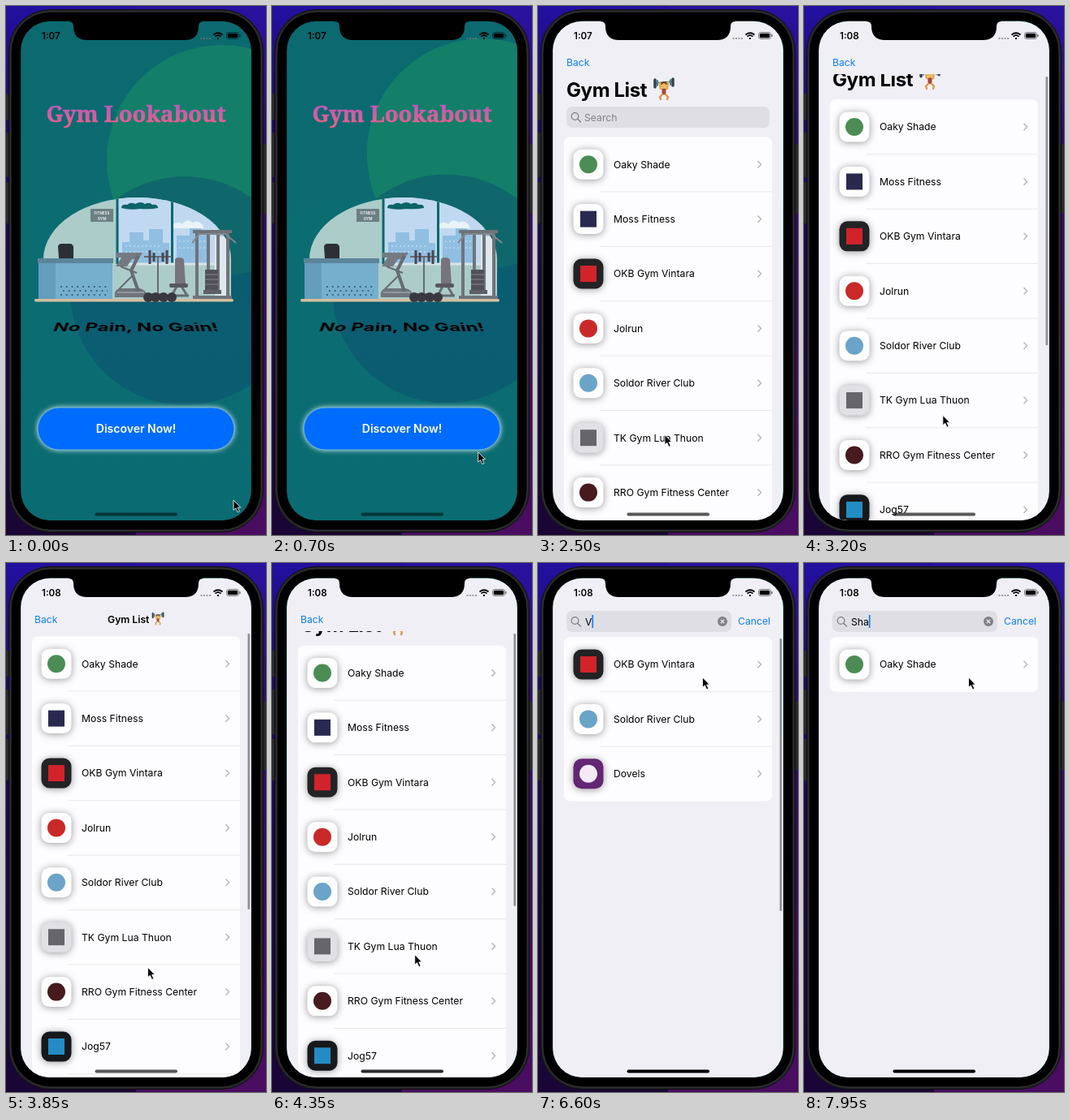
An HTML page that plays this animation: 320 by 652 pixels, repeating every 8 s.

```html
<!DOCTYPE html>
<html lang="en">
<head>
<meta charset="utf-8">
<title>Gym finder</title>
<style>
html, body { margin: 0; width: 100%; height: 100%; overflow: hidden; background: #160a3c; }
#stage { position: relative; width: 320px; height: 652px; overflow: hidden; }
#stage svg, #screen, #home, #list { position: absolute; left: 0; top: 0; width: 320px; height: 652px; }
#screen { clip-path: inset(18.7px 18.2px 18px 18.2px round 36px); }
#home { background: linear-gradient(#0b696f, #0b6d72 60%, #0a6b72); }
#slogan {
  position: absolute; left: 0; top: 381px; width: 320px; height: 30px;
  font: 700 24px/30px Inter, sans-serif; text-align: center; white-space: nowrap;
  transform: perspective(350px) rotateX(55deg);
}
text { font-family: Inter, sans-serif; font-size: 12.2px; }
.logo { font: 700 27.5px "Noto Serif", serif; }
.blue { fill: #0f7fee; }
.tile { filter: drop-shadow(0 1px 5px #0006); }
</style>
</head>
<body>
<div id="stage">
  <svg viewBox="0 0 320 652">
    <defs>
      <linearGradient id="wallLeft" x2="0" y2="1">
        <stop stop-color="#2310a0"/><stop offset=".2" stop-color="#1d0a6e"/>
        <stop offset=".5" stop-color="#1b0750"/><stop offset="1" stop-color="#1a0536"/>
      </linearGradient>
      <linearGradient id="wallRight" x2="0" y2="1">
        <stop stop-color="#2a12a0"/><stop offset=".25" stop-color="#2c0b70"/>
        <stop offset=".6" stop-color="#3a0a5c"/><stop offset="1" stop-color="#4a0d62"/>
      </linearGradient>
    </defs>
    <rect width="160" height="652" fill="url(#wallLeft)"/>
    <rect x="160" width="160" height="652" fill="url(#wallRight)"/>
    <path d="M0 108h5v32H0zM0 156h5v55H0zM0 217h5v51H0zM315 170h5v85h-5z" fill="#29282c"/>
    <rect x="3.5" y="4.5" width="313" height="644" rx="51" fill="#232325" stroke="#101012"/>
    <rect x="6" y="7" width="308" height="639" rx="49" stroke="#444447" stroke-width=".8"/>
  </svg>

  <div id="screen">
    <div id="home">
      <svg viewBox="0 0 320 652">
        <defs>
          <linearGradient id="pink" x2="0" y2="1">
            <stop offset=".15" stop-color="#b957c2"/><stop offset=".85" stop-color="#e8608c"/>
          </linearGradient>
          <clipPath id="dome"><path d="M46 362V312A115.500 76 0 0 1 277 312V362z"/></clipPath>
        </defs>
        <circle id="green" r="142" fill="#137f68"/>
        <circle id="navy" r="141" fill="#0d496f" opacity=".45"/>
        <text class="logo" x="160" y="143" text-anchor="middle" fill="url(#pink)" stroke="url(#pink)" stroke-width=".5">Gym Lookabout</text>

        <g clip-path="url(#dome)">
          <rect x="41" y="230" width="240" height="132" fill="#acccca"/>
          <rect x="138" y="230" width="123" height="88" fill="#c0d9f0"/>
          <path d="M143 318V291h9V279h17V289h7V275h17V292h8V318zM210 318V283h16V270h14V281h10V318z" fill="#90bfe2"/>
          <path d="M147 296h42M147 303h42M213 290h34M213 298h34" stroke="#b4d4ed" stroke-width="2" stroke-dasharray="2 3"/>
          <path d="M205 270q6-6 12-1q5-8 13-2q7-4 13 4v3h-38z" fill="#eaf3fa"/>
          <path d="M137 230v88M204.500 230v88" stroke="#0b676c" stroke-width="3"/>
          <path d="M138 318h124" stroke="#d8e6e6" stroke-width="3"/>
          <path d="M257 284h14v77h-14z" fill="#dfe8ee"/>
        </g>
        <path d="M142 249q0-5 7-4q5-4 10-1q7-4 12 0q6-3 9 1q7-1 7 4q-10 2-22 1q-12 2-23-1z" fill="#0c6467"/>
        <rect x="104" y="250" width="28" height="16" fill="#6c7f83"/>
        <g fill="#e8eeee" text-anchor="middle" font-weight="700">
          <text x="118" y="257" style="font-size:4.500px">FITNESS</text>
          <text x="118" y="263.500" style="font-size:4.500px">GYM</text>
        </g>
        <rect x="35" y="361" width="245" height="3.500" rx="1.700" fill="#d5bf9d"/>
        <path d="M65 311L64 296q1-3 4-3l11 0q3 0 4 4l0 14z" fill="#2c3036"/>
        <path d="M40 317h91v44H40z" fill="#76afce"/>
        <path d="M40 317h21v44H40z" fill="#659dbc"/>
        <path d="M39 311h93v6H39z" fill="#5c8599"/>
        <path d="M67 346h58M70 351h55M67 356h58" stroke="#35617b" stroke-width="1.800" stroke-dasharray="1.800 5"/>
        <path d="M136 304h32l-5 8h-8l-6 9h-14l7-11h-6z" fill="#757a82"/>
        <path d="M134 359q-2-8 5-11h26q8 2 9 11z" fill="#70757d"/>
        <g fill="none" stroke="#666b73">
          <path d="M163 308l-9 18l9 26" stroke-width="4"/>
          <path d="M141 321l20 8M139 349l17-17" stroke-width="2"/>
          <path d="M137 353h33" stroke="#91979e" stroke-width="2"/>
          <path d="M170 309h34M187 309v45M176 355h21" stroke-width="2"/>
          <path d="M177 301v17M182 304v11M193 304v11M198 301v17" stroke="#4b4750" stroke-width="3"/>
          <path d="M212 342l-8 15M214 342l9 15M202 357h23" stroke-width="3"/>
          <path d="M235 277v83M273 277v83M249 277v76M261 277v76M230 278h48M230 359h48" stroke="#70737a" stroke-width="4"/>
          <path d="M229 292l9-11h32l13 11" stroke="#84868d" stroke-width="2"/>
        </g>
        <path d="M208 313q0-3 5-3t6 3l2 30h-13z" fill="#77747e"/>
        <rect x="201" y="342" width="23" height="5" rx="2" fill="#595760"/>
        <path d="M245 325h16v25h-16z" fill="#505159"/>
        <path d="M245 331h16M245 337h16M245 343h16" stroke="#85878e"/>
        <rect x="243" y="350" width="22" height="5" fill="#5f6068"/>
        <path d="M170 359h36" stroke="#888" stroke-width="3"/>
        <g fill="#383940"><circle cx="175" cy="359" r="6"/><circle cx="184" cy="359" r="6"/><circle cx="194" cy="359" r="6"/><circle cx="204" cy="359" r="6"/></g>

        <rect x="39" y="495" width="242" height="52" rx="26" fill="#006cff" stroke="#6db6d0" style="filter:drop-shadow(0 0 3px #d5e7e8)"/>
        <text id="cta" text-anchor="middle" y="5" fill="#fff" style="font-size:14px" font-weight="600">Discover Now!</text>
      </svg>
      <div id="slogan">No Pain, No Gain!</div>
    </div>

    <div id="list">
      <svg viewBox="0 0 320 652">
        <defs>
          <clipPath id="below"><rect y="84" width="320" height="568"/></clipPath>
          <g id="lifter" fill="none" stroke-linecap="round">
            <path d="M2 5L24 3" stroke="#555d66" stroke-width="1.500"/>
            <path d="M2 1v9M24 0v8" stroke="#30424e" stroke-width="3.500"/>
            <path d="M5 2v6M21 1v6" stroke="#3e8596" stroke-width="2"/>
            <path d="M8 5l1 7l4 1l4-1l1-8" stroke="#e4a94f" stroke-width="2.600"/>
            <circle cx="13" cy="8" r="3.300" fill="#edb95c"/>
            <path d="M10 6q3-4 6 0" stroke="#6b4327" stroke-width="2"/>
            <path d="M13 14v3" stroke="#a8483a" stroke-width="5"/>
            <path d="M11 19l-3 3l1 3M15 19l3 3l-1 3" stroke="#d99c4c" stroke-width="2.400"/>
          </g>
        </defs>
        <rect width="320" height="652" fill="#f0eff6"/>
        <g id="rows">
          <rect id="card" x="32" width="256" rx="7" fill="#fdfcfe"/>
        </g>
        <text id="back" class="blue" x="35" y="74">Back</text>
        <g id="small" font-weight="600">
          <text x="125" y="73.500">Gym List</text>
          <use href="#lifter" transform="translate(179.500 61.500) scale(.58)"/>
        </g>
        <g clip-path="url(#below)">
          <g id="large">
            <text x="35" y="112" font-weight="700" letter-spacing="-.4" style="font-size:24px">Gym List</text>
            <use href="#lifter" x="142" y="90"/>
          </g>
        </g>
        <rect id="field" x="35" rx="7"/>
        <g id="inside">
          <g fill="none" stroke="#7f7e84" stroke-width="1.300" stroke-linecap="round">
            <circle cx="45.500" cy="12" r="4.300"/><path d="M49 15.500l3.500 3.500"/>
          </g>
          <text id="query" y="17.500"></text>
          <rect id="caret" y="5" width="1.700" height="16" fill="#167ef0"/>
          <g id="clear">
            <circle cx="227" cy="13" r="6" fill="#828187"/>
            <path d="M224.800 10.800l4.400 4.400M229.200 10.800l-4.400 4.400" stroke="#e8e7ee" stroke-width="1.300"/>
          </g>
        </g>
        <text id="cancel" class="blue" y="76">Cancel</text>
        <rect id="scrollbar" x="297.500" width="2.600" rx="1.300" fill="#8f8e94"/>
      </svg>
    </div>
  </div>

  <svg viewBox="0 0 320 652">
    <path d="M77 18h166v1q-6 0-6 6q0 17-17 17H100q-17 0-17-17q0-6-6-6z"/>
    <text id="clock" x="44" y="41" font-weight="600" style="font-size:11.600px"></text>
    <path d="M239.500 40h13" stroke="#777" stroke-opacity=".7" stroke-width="2" stroke-dasharray="2 1.500"/>
    <g fill="none" stroke="#000" stroke-width="1.700">
      <path d="M255.500 35.500q5.500-4.500 11 0M257.500 37.700q3.500-3 7 0"/>
      <path d="M260 40h2" stroke-width="2"/>
    </g>
    <rect x="271.500" y="32.500" width="15" height="8" rx="2.500" fill="none" stroke="#0007"/>
    <rect x="272.800" y="33.800" width="12.400" height="5.400" rx="1.500"/>
    <path d="M288 35v3" stroke="#0009" stroke-width="1.200"/>
    <rect id="homebar" x="109.500" y="624.500" width="101.500" height="4" rx="2"/>
    <g id="pointer">
      <path d="M0 0V14.500L3.300 11.500L6 17.500L8.600 16.300L6 10.600H10.300z" transform="scale(.85)" stroke="#fff" stroke-linejoin="round"/>
    </g>
  </svg>
</div>

<script>
const LOOP = 8000, PITCH = 67.4;
const $ = id => document.getElementById(id);
const set = (el, attrs) => { for (const k in attrs) el.setAttribute(k, attrs[k]); };
const make = (tag, attrs, parent) => {
  const el = document.createElementNS('http://www.w3.org/2000/svg', tag);
  set(el, attrs);
  return parent.appendChild(el);
};
const clamp = v => Math.max(0, Math.min(1, v));
const mix = (a, b, k) => a + (b - a) * k;

// Eased value at t from [time, value] steps.
function track(t, steps) {
  let [t0, v0] = steps[0];
  for (const [t1, v1] of steps) {
    if (t < t1) {
      const k = clamp((t - t0) / (t1 - t0));
      return mix(v0, v1, k * k * (3 - 2 * k));
    }
    [t0, v0] = [t1, v1];
  }
  return v0;
}
const latest = (t, steps) => steps.filter(s => s[0] <= t).pop()[1];

// name, tile colour, mark colour, mark is round
const gyms = [
  ['Oaky Shade', '#fdfdfd', '#4b8c55', 1],
  ['Moss Fitness', '#fdfdfd', '#29294f', 0],
  ['OKB Gym Vintara', '#232325', '#d2232b', 0],
  ['Jolrun', '#fdfdfd', '#c92a27', 1],
  ['Soldor River Club', '#fdfdfd', '#6ba4c9', 1],
  ['TK Gym Lua Thuon', '#e1e0e4', '#65656a', 0],
  ['RRO Gym Fitness Center', '#fdfdfd', '#471a1d', 1],
  ['Jog57', '#17181b', '#238cc4', 0],
  ['Dovels', '#632673', '#f3eaf5', 1],
].map(([name, tile, mark, round]) => {
  const g = make('g', {}, $('rows'));
  const line = make('path', { d: 'M76 0H288', stroke: '#e3e2e8', 'stroke-width': .8 }, g);
  make('rect', { class: 'tile', x: 43.5, y: 15.2, width: 37, height: 37, rx: 10, fill: tile }, g);
  if (round) make('circle', { cx: 62, cy: 33.7, r: 11, fill: mark }, g);
  else make('rect', { x: 52, y: 23.7, width: 20, height: 20, fill: mark }, g);
  make('text', { x: 93, y: 38 }, g).textContent = name;
  make('path', { d: 'M270.500 29.500l4 4.200l-4 4.200', fill: 'none', stroke: '#b9b8be', 'stroke-width': 1.5 }, g);
  return { name: name.toLowerCase(), g, line };
});

const pointerX = [[150, 280], [1050, 240.5], [1500, 240.5], [2350, 156], [2700, 156], [3400, 174.5], [4250, 174.5], [5050, 202.5]];
const pointerY = [[150, 609], [1050, 520], [1500, 520], [2350, 528.5], [2700, 528.5], [3400, 498.5], [4250, 498.5], [5050, 141]];
const scrolling = [[2750, 0], [3500, 71], [4200, 71], [4800, 0], [5250, 0], [5430, -6], [5500, -6], [5650, 0]];
const typing = [[0, ''], [6300, 'V'], [6950, ''], [7250, 'S'], [7500, 'Sh'], [7750, 'Sha']];

function drawHome(t) {
  const k = t / 1350;
  set($('green'), { cx: 266 - 14 * k, cy: 190 - 15 * k });
  set($('navy'), { cx: 220 - 10 * k, cy: 351 - 5 * k });
  const grow = track(t, [[1100, 1], [1300, 1.27], [1450, 1.27], [1650, 1]]);
  set($('cta'), { transform: `translate(160 521) scale(${grow})` });
}

function drawRows(query, top) {
  let count = 0;
  for (const { name, g, line } of gyms) {
    const shown = name.includes(query.toLowerCase());
    g.style.display = shown ? '' : 'none';
    if (!shown) continue;
    line.style.display = count ? '' : 'none';
    set(g, { transform: `translate(0 ${top + PITCH * count++})` });
  }
  set($('card'), { y: top, height: PITCH * count });
}

function drawList(t) {
  const scroll = track(t, scrolling);
  const search = track(t, [[5520, 0], [5880, 1]]);
  const query = latest(t, typing);
  const squeeze = clamp(scroll / 33);
  const titleY = scroll < 0 ? -scroll : -Math.max(0, scroll - 33);
  const fieldY = mix(124 + titleY, 59, search);

  $('list').style.transform = `translateY(${track(t, [[1480, 652], [1950, 0]])}px)`;
  drawRows(query, mix(161.5 - scroll, 91.3, search));
  set($('large'), { transform: `translate(0 ${titleY - 40 * search})`, opacity: 1 - search });
  set($('small'), { opacity: clamp((scroll - 64) / 6) });
  set($('back'), { opacity: 1 - search });
  set($('field'), {
    y: fieldY, width: mix(250, 203, search), height: 26 * (1 - squeeze),
    fill: t > 5300 && t < 5560 ? '#cbcacf' : '#dfdee5',
  });
  set($('inside'), { transform: `translate(0 ${fieldY - 13 * squeeze})`, opacity: clamp(1 - squeeze * 2) });
  set($('cancel'), { x: mix(300, 246, search), opacity: search });

  const text = $('query');
  text.textContent = query || 'Search';
  set(text, { x: query ? 58 : 57, fill: query ? '#000' : '#828188' });
  set($('caret'), { x: 58 + (query ? text.getComputedTextLength() : 0), opacity: search === 1 ? 1 : 0 });
  set($('clear'), { opacity: query ? 1 : 0 });
  set($('scrollbar'), {
    y: mix(87, 93, search),
    height: mix(340 - (71 - scroll) * .35, 336, search),
    opacity: track(t, [[2750, 0], [2900, 1], [6700, 1], [7000, 0]]),
  });
}

function draw(t) {
  drawHome(t);
  drawList(t);
  $('clock').textContent = t < 3200 ? '1:07' : '1:08';
  set($('homebar'), { opacity: track(t, [[1500, .5], [2000, .65], [4000, .65], [4700, 1]]) });
  set($('pointer'), { transform: `translate(${track(t, pointerX)} ${track(t, pointerY)})` });
}

const start = performance.now();
function frame() {
  draw((performance.now() - start) % LOOP);
  requestAnimationFrame(frame);
}
frame();
</script>
</body>
</html>
```
